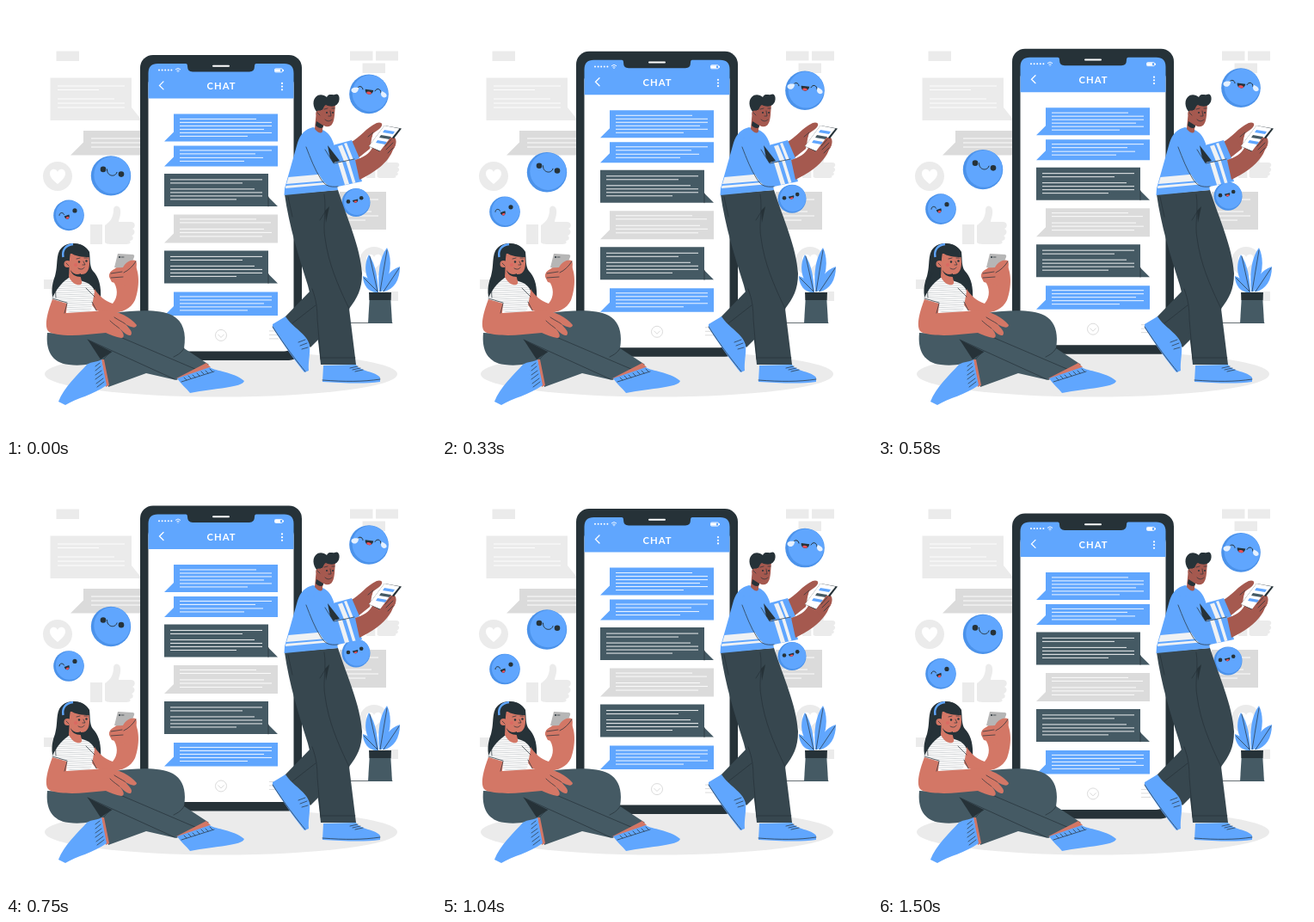
These frames come from a looping animation (500x500 px, 1540 ms). An HTML page:

```html
<!DOCTYPE html>
<html lang="en">
<head>
<meta charset="utf-8">
<title>Chat</title>
<style>
html, body { margin: 0; width: 100%; height: 100%; overflow: hidden; background: #fff; }
svg { display: block; width: 100%; height: 100%; }
.blue { fill: #60a6fe; }
.ink { fill: #263238; }
.slate { fill: #455a64; }
.pants { fill: #37474f; }
.pale { fill: #ebebeb; }
.gray { fill: #dbdbdb; }
.white { fill: #fff; }
.band { fill: #f0f2f4; }
.skin { fill: #d37766; }
.brown { fill: #a5594f; }
.red { fill: #e8505b; }
.line { fill: none; stroke: #263238; stroke-width: .7; stroke-linecap: round; stroke-linejoin: round; }
.smile { fill: none; stroke: #263238; stroke-width: 1; stroke-linecap: round; }
.wl { fill: none; stroke: #fff; stroke-width: .9; }
.title { font: 700 11.3px Lato, sans-serif; letter-spacing: 1px; fill: #fff; text-anchor: middle; }
</style>
</head>
<body>
<svg viewBox="0 0 500 500">
<defs>
  <pattern id="knit" width="8" height="2.5" patternUnits="userSpaceOnUse" patternTransform="rotate(-2)">
    <rect width="8" height="2.5" fill="#fafafa"/><rect width="8" height=".5" fill="#b9bfc2"/>
  </pattern>
  <path id="heart" d="M0 9C-5 5-9 1-9-3C-9-9-2-10 0-5C2-10 9-9 9-3C9 1 5 5 0 9Z"/>
  <path id="thumb" d="M0 22H14V45H0ZM17 23C23 19 27 14 27 5C27-1 34-1 35 5C36 11 33 16 33 19H47C53 19 53 26 49 27C53 29 52 34 48 35C51 37 50 41 46 41C48 44 45 45 41 45H24C20 45 18 44 17 43Z"/>
</defs>

<g id="back"></g>
<ellipse class="pale" cx="250" cy="428" rx="205" ry="26.5"/>

<g id="plant">
  <path class="line" d="M400 368.5H449"/>
  <g class="blue">
    <path d="M431 332C419 321 414 304 422 289C430 301 432 316 433 332Z"/>
    <path d="M434 332C432 312 434 293 443 281C450 296 447 315 437 332Z"/>
    <path d="M438 332C439 316 446 307 458 303C458 319 451 329 440 332Z"/>
    <path d="M431 333C422 333 415 325 415 314C424 317 430 324 433 333Z"/>
  </g>
  <path class="line" d="M423 291L432 332M443 284L435 332M457 305L439 332M416 316L432 332"/>
  <path class="slate" d="M423 335H447L449 369H421Z"/>
  <path class="ink" d="M422 333H448L447.500 342H422.500Z"/>
</g>

<g class="float" id="phone"></g>
<g class="float" id="faces"></g>

<g id="man">
  <path class="pants" d="M345 300L356 329L324 362L354 397L399 352L392 300Z"/>
  <path class="pants" d="M324 219L386 214C397 248 412 280 414 311C414 330 408 340 399 352L407 417H366C363 386 359 355 351 325C340 290 329 255 324 219Z"/>
  <path class="line" d="M370 219C373 237 368 254 371 270C375 300 386 325 399 352M356 329C361 342 362 353 362 364L366 411M333 369L360 348M366 409H406M328 222L333 245M372 238L365 249"/>
  <path class="ink" d="M371 238L376 233L372 252Z"/>
  <path class="blue" d="M310 370L325 361C333 374 350 381 353 394C354 405 351 414 352 424L347 426C338 415 324 396 310 374Z"/>
  <path class="line" d="M340 391L348 388M342 395L350 392M344 399L351 397M310 373C324 395 338 413 348 425"/>
  <path class="blue" d="M369 418L407 417C412 425 430 425 435 432V437C414 440 390 438 368 437Z"/>
  <path class="line" d="M400 421L409 419M403 423L412 421M406 425L415 423M368 435C394 437 415 437 435 434"/>

  <path class="brown" d="M400 159C413 152 418 142 431 136C437 134 440 138 434 143L427 148C424 155 425 160 423 166L408 178Z"/>
  <path class="blue" d="M376 163L402 156L411 177L386 188Z"/>
  <path class="band" d="M386 163L391 161.500L399 181L394 183ZM393 160L396 159L404 179L401 181Z"/>
  <path class="blue" d="M357 141C348 143 342 149 339 159L324 212L323.500 220L386 214L384 205L381 160C378 151 373 145 367 144Z"/>
  <path class="band" d="M328.500 199L384 194L385 202L326 207ZM325.500 209L385 204L385 206.500L325 212Z"/>
  <path class="ink" d="M374 162L388 180L378 183Z"/>
  <path class="blue" d="M349 154C359 150 367 157 371 167L381 183L406 178L414 204L386 210C374 212 368 204 363 194Z"/>
  <path class="band" d="M386 182L391 181L399 207L394 208ZM395 180L398.500 179L406.500 205.500L403 206Z"/>
  <path class="line" d="M349 164C354 177 359 190 366 201C371 209 376 211 386 210M371 167L381 183L405 178"/>
  <path class="brown" d="M406 179C416 176 422 172 426 165L449 151C455 153 455 161 450 167C445 182 428 194 411 202Z"/>
  <path class="ink" d="M422 163L440 139L460 142.500L438 171Z"/>
  <path class="white" d="M422 163L440 139L457.500 142.500L436 169Z"/>
  <path class="blue" d="M440 144L452 146L450 149L438 147Z"/>
  <path class="slate" d="M436 150L448 152L446 155L434 153Z"/>
  <path class="blue" d="M432 156L443 158L441 161L430 159Z"/>
  <path class="brown" d="M434 170L447 153C455 153 454 164 449 168L441 178ZM417 153C422 145 428 147 425 153L421 162Z"/>
  <path class="line" d="M448 155L441 163M450 159L442 167M450 165L444 171M427 147L421 152"/>

  <path class="brown" d="M361 121L359 143C364 149 369 149 368 143L369 139C378 143 381 137 382 127L383 113L367 110Z"/>
  <path class="ink" d="M361 134L369 139C369 143 364 143 360 139Z"/>
  <path class="ink" d="M364 125C358 122 355 111 360 106C364 102 369 103 373 106C375 101 380 104 382 103C388 100 389 109 386 113C383 118 376 117 372 115C369 116 369 122 366 121Z"/>
  <circle class="brown" cx="364" cy="125" r="3.6"/>
  <path class="line" d="M370 120L374 119M379 119L382 119M377 122L378 128L375 128M371 132C374 135 377 134 379 132M362 124L365 127"/>
  <circle class="ink" cx="373" cy="124" r="1"/><circle class="ink" cx="380" cy="124" r="1"/>
</g>

<g id="woman">
  <path class="ink" d="M66 280C57 287 61 301 57 314C53 324 52 336 56 343C64 347 76 344 82 330L101 328C103 333 106 338 110 341C111 326 108 315 101 308C97 303 98 294 97 286C90 274 73 274 66 280Z"/>
  <path class="skin" d="M103 329C108 337 115 343 124 346C131 338 130 327 124 319L121 310L131 302L146 296C157 306 155 329 150 342C143 357 123 360 105 354L97 344Z"/>
  <path d="M130 288L148 289Q150 290 149 292L143 306L126 304Z" fill="#b6b6b6"/>
  <circle class="ink" cx="132" cy="292" r="1"/><path class="line" d="M134 292L137 292"/>
  <path class="skin" d="M120 315C119 307 129 304 136 304C139 297 147 294 151 296C153 300 151 307 150 314L139 325L123 321Z"/>
  <path class="line" d="M122 311L135 309M122 316L136 315M151 297C147 303 143 307 137 310"/>
  <path class="slate" d="M48 380C46 400 53 415 73 417C88 419 101 416 112 412L119 443L163 427L198 435L236 417L207 398C210 380 206 367 194 360C178 352 151 354 126 357L91 382Z"/>
  <path class="ink" d="M95 388L123 402L110 411Z"/>
  <path class="line" d="M95 388L196 434M123 402C115 407 112 413 112 414M207 398C204 403 201 405 195 408M133 385L222 423"/>
  <path class="skin" d="M111 411L114 411L120 441L116 443ZM198 433L233 415L238 420L204 435Z"/>
  <path class="blue" d="M111 411L117 441C102 452 82 456 69 464L61 460C67 444 83 429 94 417C100 413 107 414 111 411Z"/>
  <path class="line" d="M109 415L104 419M110 419L104 424M111 424L104 429M112 428L104 434M113 433L105 439M114 437L106 443"/>
  <path class="blue" d="M199 433L237 420C244 425 264 425 277 436C274 444 244 444 214 450C210 445 203 439 199 433Z"/>
  <path class="line" d="M207 432L210 435M212 430L215 433M217 429L220 432M222 427L225 430M227 425L230 428M232 424L235 427M237 422L240 425M204 437L242 425"/>

  <path fill="url(#knit)" d="M76 314L89 320C97 322 102 327 103 332L99 354C90 359 80 358 71 355L70 346L53 342C58 329 66 320 76 314Z"/>
  <path class="skin" d="M54 341L71 346L70 357L119 354C131 355 145 362 152 371C151 376 144 373 139 370C144 376 148 379 145 383C140 384 135 377 132 375C138 381 138 386 134 386C128 385 121 382 116 380L94 382C76 384 54 383 49 378C44 371 49 354 54 341Z"/>
  <path class="line" d="M126 362C132 366 137 368 139 370M121 366C126 371 130 373 132 375M71 346L68 357M54 340L71 345M93 328L103 338M100 344L105 354"/>
  <path class="skin" d="M73 288L73 315C79 327 90 326 88 320L86 312C95 313 97 306 97 298L96 287Z"/>
  <path class="ink" d="M75 307C78 312 83 313 87 311L87 315C81 315 76 312 75 307Z"/>
  <path class="ink" d="M66 281C76 273 92 275 97 287L97 292C89 292 80 291 75 287C73 296 74 307 73 314L62 322C61 309 60 291 66 281Z"/>
  <circle class="skin" cx="71.500" cy="300" r="4"/>
  <path d="M66.500 292C65 284 69 278 78 277" fill="none" stroke="#60a6fe" stroke-width="2.400"/>
  <path class="line" d="M82 294L86 293M91 293L95 293M90 297L92 301L89 301M84 305C87 307 90 306 91 304M70 299L73 302M100 310C105 318 107 326 108 334M64 310C58 320 57 331 58 339"/>
  <circle class="ink" cx="85" cy="297.500" r="1.200"/><circle class="ink" cx="93.500" cy="296.500" r="1.200"/>
  <circle class="red" cx="81" cy="301" r="2" opacity=".35"/>
</g>
</svg>

<script>
const $ = id => document.getElementById(id);
const rect = (c, x, y, w, h) => `<rect class="${c}" x="${x}" y="${y}" width="${w}" height="${h}"/>`;
const path = (c, d) => `<path class="${c}" d="${d}"/>`;
const dot = (x, y, r, c = 'ink') => `<circle class="${c}" cx="${x}" cy="${y}" r="${r}"/>`;

// rows: [offset from the top, length]
function bubble(c, x, y, w, h, side, rows, pad = 7, tail = 11) {
  const b = y + h, e = side < 0 ? x : x + w;
  return path(c, `M${x} ${y}H${x + w}V${b}H${x}ZM${e} ${b - tail}V${b}h${side * tail}Z`) +
    (side > 0 ? path('line', `M${e} ${b - tail}V${b}`) : '') +
    rows.map(([dy, len]) => path('wl', `M${x + pad} ${y + dy}h${len}`)).join('');
}

function drawBack() {
  const heart = (x, y) => dot(x, y, 17, 'pale') + `<use href="#heart" class="white" x="${x}" y="${y}"/>`;
  $('back').innerHTML =
    rect('pale', 58.5, 52.5, 26.5, 11.5) + rect('pale', 44, 318, 14, 11) +
    rect('pale', 400, 52.5, 26.5, 11) + rect('pale', 430, 52.5, 26, 11) +
    rect('pale', 414.5, 66.5, 26.5, 11.5) + rect('pale', 440, 332, 16, 11) +
    path('pale', 'M146 118V133H158Z') +
    rect('pale', 51.5, 83.5, 94.5, 49.5) +
    [[93, 78], [97.5, 48], [108, 66], [113, 78], [118, 78]].map(([y, n]) => path('wl', `M60 ${y}h${n}`)).join('') +
    bubble('gray', 90, 145, 72, 28.5, -1, [[9, 62], [14, 62], [19, 62]], 9, 15) +
    rect('gray', 388, 216, 54, 44) +
    [[225, 433], [230, 420], [239, 425], [244, 433], [249, 418]].map(([y, x]) => path('wl', `M394 ${y}H${x}`)).join('') +
    heart(60, 198) + heart(428, 297) +
    '<use href="#thumb" class="pale" x="98" y="232"/>' +
    '<use href="#thumb" class="pale" transform="translate(419 169) scale(.74 .69)"/>';
}

function drawPhone() {
  const blueRows = [[6, 89], [10, 107], [14, 107], [18, 98], [22, 107], [26, 79]];
  const darkRows = [[7, 107], [11, 84], [18, 98], [22, 107], [26, 107], [30, 77]];
  let s = '<rect class="ink" x="156" y="57" width="188" height="355" rx="15"/>' +
    '<rect class="white" x="165.500" y="80" width="169" height="321.500" rx="11"/>' +
    path('blue', 'M165.500 107.500V78Q165.500 67 176.500 67H209Q211 67 211 70Q211 76.500 217 76.500H283Q289 76.500 289 70Q289 67 291 67H323.500Q334.500 67 334.500 78V107.500Z') +
    '<rect class="white" x="240" y="68.800" width="20" height="2" rx="1"/>';
  for (let i = 0; i < 5; i++) s += dot(178 + i * 3.6, 74.7, 1, 'white');
  s += path('wl', 'M197 74Q200 71 203 74M198.500 75.500Q200 74 201.500 75.500') + dot(200, 76.6, .6, 'white') +
    '<rect class="wl" x="312.500" y="73" width="9" height="4" rx="1"/>' +
    rect('white', 313, 73.5, 6, 3) + rect('white', 322, 74, 1, 2) +
    '<path class="wl" stroke-linecap="round" style="stroke-width:1.300" d="M183 88L178.500 92.500L183 97"/>' +
    '<text class="title" x="250.600" y="97.500">CHAT</text>';
  for (const y of [90, 93.7, 97.4]) s += dot(321, y, 1.1, 'white');
  s += bubble('blue', 195, 125.5, 121, 32, -1, blueRows) +
    bubble('blue', 195, 162.5, 121, 24, -1, [[5.5, 107], [9.5, 88], [14, 97], [18, 75]]) +
    bubble('slate', 184, 195, 121, 38, 1, darkRows) +
    bubble('gray', 195, 242.5, 121, 33, -1, [[5.5, 89], [9.5, 106], [17, 98], [21, 107], [25.5, 96]]) +
    bubble('slate', 184, 284.5, 121, 38, 1, darkRows) +
    bubble('blue', 195, 332.5, 121, 27.5, -1, [[5.5, 107], [9.5, 107], [13.5, 98], [17.5, 107], [21.5, 79]]);
  s += '<g fill="none" stroke="#dbdbdb"><circle cx="250" cy="383" r="6.500"/>' +
    '<path d="M246.500 382L250 385.500L253.500 382M306 378H317M306 382.500H317M306 387H317"/></g>';
  $('phone').innerHTML = s;
}

function drawFaces() {
  const ball = (x, y, r) => `<circle cx="${x}" cy="${y}" r="${r}" fill="#4b92ea"/>` +
    `<ellipse class="blue" cx="${x + r * .06}" cy="${y - r * .04}" rx="${r * .91}" ry="${r * .93}"/>`;
  const mouth = (x, y, w, h, a) => `<g transform="translate(${x} ${y}) rotate(${a})">` +
    path('ink', `M${-w} 0H${w}C${w} ${h * 1.3} ${-w} ${h * 1.3} ${-w} 0Z`) +
    `<ellipse class="red" cy="${h * .68}" rx="${w * .6}" ry="${h * .28}"/></g>`;
  $('faces').innerHTML =
    ball(122, 197.5, 23.2) + dot(113, 190, 3.3) + dot(134, 195.7, 3.3) +
    path('smile', 'M117.500 190C117 198 127 200 129 193.500') +
    ball(73, 243.5, 17.8) + dot(80, 238, 2.6) +
    path('smile', 'M62 243.500C62 240 66.500 239.500 67.500 242.500') + mouth(70.5, 243.5, 3, 4.5, -20) +
    ball(422, 102.5, 22.8) +
    path('smile', 'M408 97C409 92 415 93 415 97M429 99C431 95 436 96 436 101') + mouth(422.5, 97.5, 4.8, 5.5, 7) +
    '<g fill="#e6f1ff"><path d="M410 95C404 94 400 96 402 99.500C406 103 410 100 410 95Z"/>' +
    '<path d="M437 99C443 101 444.500 106 440 106.500C436 106 435 102 437 99Z"/></g>' +
    ball(407, 228.5, 16.5) + dot(398, 227.5, 2.3) + dot(413.2, 223.3, 2.3) + mouth(406, 225.3, 3.2, 3.6, -14);
}

const LOOP = 1540, LEAD = 55, TOP = -9, TRAVEL = 9.6;
const floats = document.querySelectorAll('.float');

// steady rise and fall
function draw(now) {
  const p = (now + LEAD) % LOOP / LOOP;
  const y = TOP + TRAVEL * Math.abs(2 * p - 1);
  for (const g of floats) g.setAttribute('transform', `translate(0 ${y.toFixed(3)})`);
}

drawBack();
drawPhone();
drawFaces();
const start = performance.now();
function tick() {
  draw(performance.now() - start);
  requestAnimationFrame(tick);
}
tick();
</script>
</body>
</html>
```
